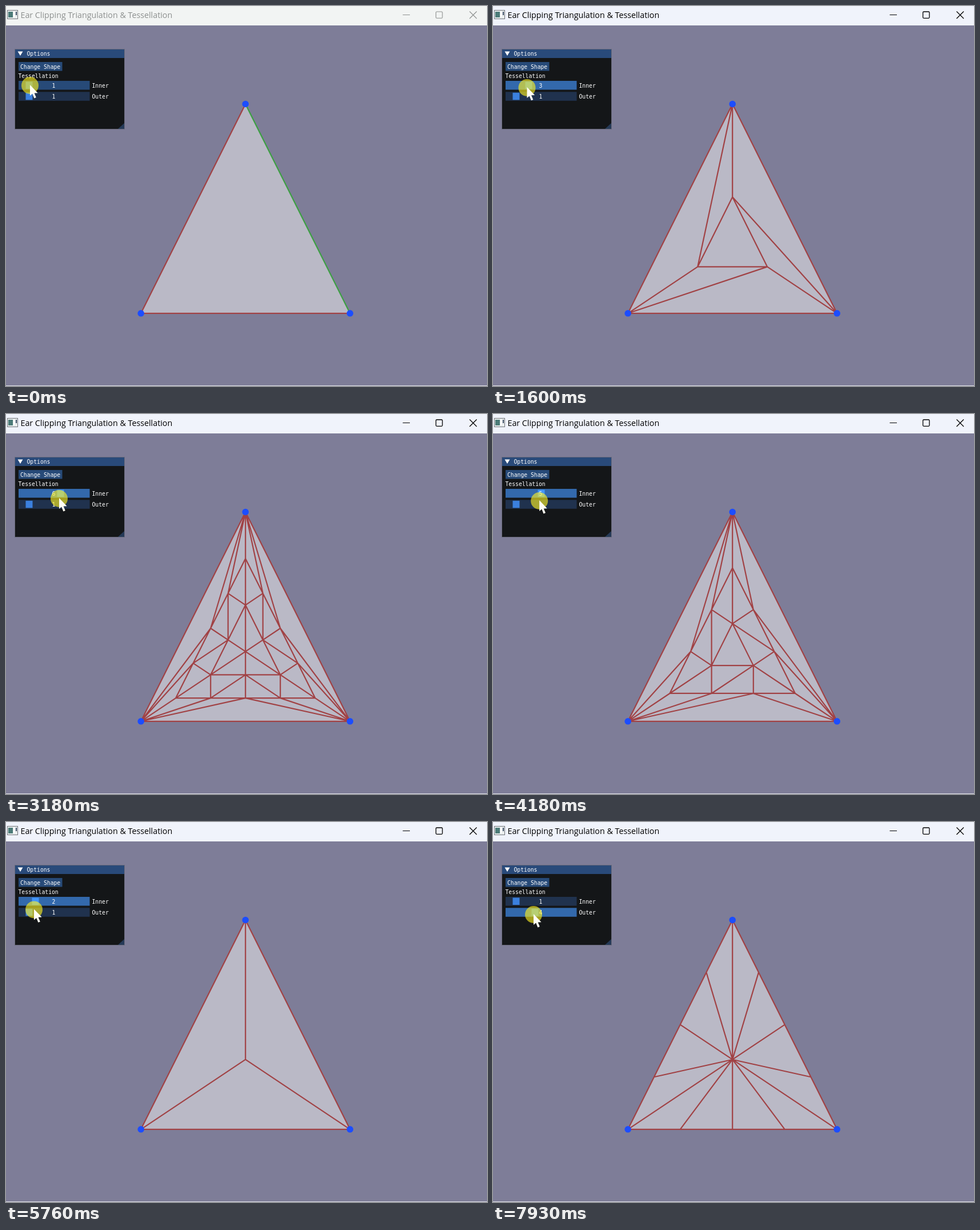
Recreate the animation shown at these times as an HTML page with a canvas. Size 842 by 665 pixels, loop 8 s.

```html
<!DOCTYPE html>
<html lang="en">
<head>
<meta charset="utf-8">
<title>Ear Clipping Triangulation &amp; Tessellation</title>
<style>
  html, body { margin: 0; width: 100%; height: 100%; overflow: hidden; background: #7e7d98; }
  canvas { display: block; width: 842px; height: 665px; }
</style>
</head>
<body>
<canvas id="stage" width="842" height="665"></canvas>
<script>
const ctx = document.getElementById('stage').getContext('2d');
const LOOP = 8000;
const INNER_DOWN = 770, INNER_UP = 6130, OUTER_DOWN = 6640;
const RED = '#a14245', GREEN = '#3da043';
const CORNERS = [[419.2, 171.5], [236.2, 537.8], [602.2, 537.8]];
const CENTER = [0, 1].map(i => CORNERS.reduce((sum, p) => sum + p[i], 0) / 3);

// Pointer moves: first step, last step, number of steps, x, y
const START = [42, 139];
const MOVES = [
  [770, 770, 1, 47, 140],
  [970, 1730, 12, 62, 143.5],
  [1800, 2070, 4, 72, 144.5],
  [2340, 2480, 3, 81, 145],
  [2830, 3180, 6, 93, 148],
  [3640, 3780, 3, 86.5, 152],
  [4040, 4460, 7, 74, 152],
  [4660, 4870, 4, 62, 153],
  [5070, 5490, 7, 51, 153],
  [5760, 6090, 5, 41, 155],
  [6170, 6510, 5, 36, 163],
  [6850, 7050, 4, 47, 163],
  [7250, 7590, 5, 62, 163],
  [7790, 7930, 3, 71, 162]
];

const mix = (p, q, k) => [p[0] + (q[0] - p[0]) * k, p[1] + (q[1] - p[1]) * k];

function pointerAt(t) {
  let pos = START;
  for (const [first, last, steps, x, y] of MOVES) {
    if (t < first) break;
    const gap = (last - first) / (steps - 1) || 1;
    const step = Math.floor((t - first) / gap + 1e-6) + 1;
    pos = mix(pos, [x, y], Math.min(1, step / steps));
  }
  return pos;
}

const levelAt = x => Math.max(1, Math.round((x - 29.5) / 11));

function rect(x, y, w, h, color) {
  ctx.fillStyle = color;
  ctx.fillRect(x, y, w, h);
}

function polygon(points, color) {
  ctx.beginPath();
  points.forEach(([x, y]) => ctx.lineTo(x, y));
  ctx.closePath();
  ctx.fillStyle = color;
  ctx.fill();
}

function disc(x, y, r, color) {
  ctx.beginPath();
  ctx.arc(x, y, r, 0, 2 * Math.PI);
  ctx.fillStyle = color;
  ctx.fill();
}

function strokeSegments(segments, color, width) {
  ctx.beginPath();
  for (const [[x1, y1], [x2, y2]] of segments) {
    ctx.moveTo(x1, y1);
    ctx.lineTo(x2, y2);
  }
  ctx.strokeStyle = color;
  ctx.lineWidth = width;
  ctx.stroke();
}

function label(text, x, y, align = 'left') {
  ctx.font = '9.72px "DejaVu Sans Mono", monospace';
  ctx.textAlign = align;
  ctx.fillStyle = '#fff';
  ctx.fillText(text, x, y);
}

// Points along one side of a ring around the centre
function ringSide(side, scale, count) {
  const a = mix(CENTER, CORNERS[side], scale);
  const b = mix(CENTER, CORNERS[(side + 1) % 3], scale);
  return Array.from({ length: count + 1 }, (_, i) => mix(a, b, count ? i / count : 0));
}

// Join an edge to the next ring, two segments shorter, with mirrored diagonals
function stitchRegular(out, inn, segments) {
  inn.forEach((p, i) => segments.push([out[i + 1], p]));
  for (let i = 0; i + 1 < inn.length; i++) {
    segments.push(i < Math.floor(inn.length / 2) ? [out[i + 1], inn[i + 1]] : [out[i + 2], inn[i]]);
  }
}

// Join edges with unrelated point counts
function stitchTransition(out, inn, segments) {
  const n = out.length - 1, m = inn.length - 1;
  const near = i => Math.ceil(i * m / n);
  for (let i = 0; i < n; i++) {
    const split = Math.ceil((near(i) + near(i + 1)) / 2);
    for (let j = near(i); j <= split; j++) segments.push([out[i], inn[j]]);
    for (let j = split; j <= near(i + 1); j++) segments.push([out[i + 1], inn[j]]);
  }
}

function tessellate(inner, outer) {
  const n = Math.max(2, inner);
  const segments = [];
  for (let side = 0; side < 3; side++) {
    let edge = ringSide(side, 1, outer);
    segments.push([edge[0], edge[outer]]);
    for (let k = 1; 2 * k <= n; k++) {
      const count = n - 2 * k;
      const next = ringSide(side, count / n, count);
      (k === 1 ? stitchTransition : stitchRegular)(edge, next, segments);
      if (k > 1) segments.push([edge[0], next[0]]);
      segments.push([next[0], next[count]]);
      edge = next;
    }
  }
  return segments;
}

function drawShape(inner, outer) {
  polygon(CORNERS, '#bab9c6');
  if (inner === 1 && outer === 1) {
    const [a, b, c] = CORNERS;
    strokeSegments([[a, b], [b, c]], RED, 2.2);
    strokeSegments([[c, a]], GREEN, 2.2);
  } else {
    strokeSegments(tessellate(inner, outer), RED, 2.2);
  }
  CORNERS.forEach(([x, y]) => disc(x, y, 5.8, '#1c4dff'));
}

function drawTitleBar(focused) {
  rect(0, 0, 842, 34, focused ? '#f0f3fb' : '#f2f4f3');
  rect(2, 7, 19, 16, '#70747a');
  rect(3, 8, 17, 14, '#e9eded');
  rect(4, 10, 8, 10, '#4c7b78');
  rect(13, 10, 3, 9, '#fff');
  rect(17, 10, 2, 6, '#3f5068');

  const ink = focused ? '#000' : '#8d908f';
  ctx.font = '14.25px "Open Sans", "Noto Sans", sans-serif';
  ctx.textAlign = 'left';
  ctx.fillStyle = ink;
  ctx.fillText('Ear Clipping Triangulation & Tessellation', 25.5, 21);

  const width = focused ? 1.3 : 1.1;
  strokeSegments([[[694.5, 15.5], [707, 15.5]]], ink, 1);
  strokeSegments([[[811.5, 9.5], [824, 22]], [[824, 9.5], [811.5, 22]]], ink, width);
  ctx.beginPath();
  ctx.roundRect(752.6, 10, 11.3, 11.3, 1.5);
  ctx.stroke();
}

function drawSlider(y, name, value, state) {
  const track = { idle: '#20324e', hover: '#274a78', active: '#3369ac' }[state];
  rect(22, y, 124.5, 15.5, track);
  rect(28.5 + 11 * value - 5, y + 1.5, 12, 12.5, state === 'active' ? '#4296fa' : '#3b80de');
  label(value, 83.5, y + 12, 'center');
  label(name, 150.5, y + 12);
}

function drawPanel(inner, outer, innerState, outerState) {
  rect(15, 75, 193, 141, '#6a6a7b');
  rect(16, 76, 191, 139, '#141618');
  rect(16, 76, 191, 15, '#294a7a');
  polygon([[20.5, 79.5], [29.5, 79.5], [25, 87]], '#fff');
  label('Options', 36.5, 87);
  rect(22, 98, 76.5, 15.5, '#274a78');
  label('Change Shape', 25, 109.5);
  label('Tessellation', 21.5, 126);
  drawSlider(131, 'Inner', inner, innerState);
  drawSlider(150.3, 'Outer', outer, outerState);
  polygon([[207, 205], [207, 215], [196, 215]], '#253a58');
}

function drawPointer(x, y) {
  disc(x, y, 15, 'rgba(255, 242, 32, 0.62)');
  const arrow = [[0, -1], [0, 18], [4.2, 14.6], [7.4, 22.4], [10.8, 21], [7.6, 13.4], [13.6, 13.2]];
  polygon(arrow.map(p => [x + p[0], y + p[1]]), '#fffef4');
}

function draw(t) {
  const [x, y] = pointerAt(t);
  const inner = t >= INNER_DOWN && t < INNER_UP ? levelAt(x) : 1;
  const outer = t >= OUTER_DOWN ? levelAt(x) : 1;
  const innerState = t < INNER_DOWN ? 'hover' : t < INNER_UP ? 'active' : 'idle';
  const outerState = t < INNER_UP ? 'idle' : t < OUTER_DOWN ? 'hover' : 'active';

  rect(0, 0, 842, 665, '#7e7d98');
  rect(0, 664, 842, 1, '#e2e3ea');
  drawTitleBar(t >= INNER_DOWN);
  drawShape(inner, outer);
  drawPanel(inner, outer, innerState, outerState);
  drawPointer(x, y);
}

const begin = performance.now();
function tick() {
  draw((performance.now() - begin) % LOOP);
  requestAnimationFrame(tick);
}
tick();
</script>
</body>
</html>
```
